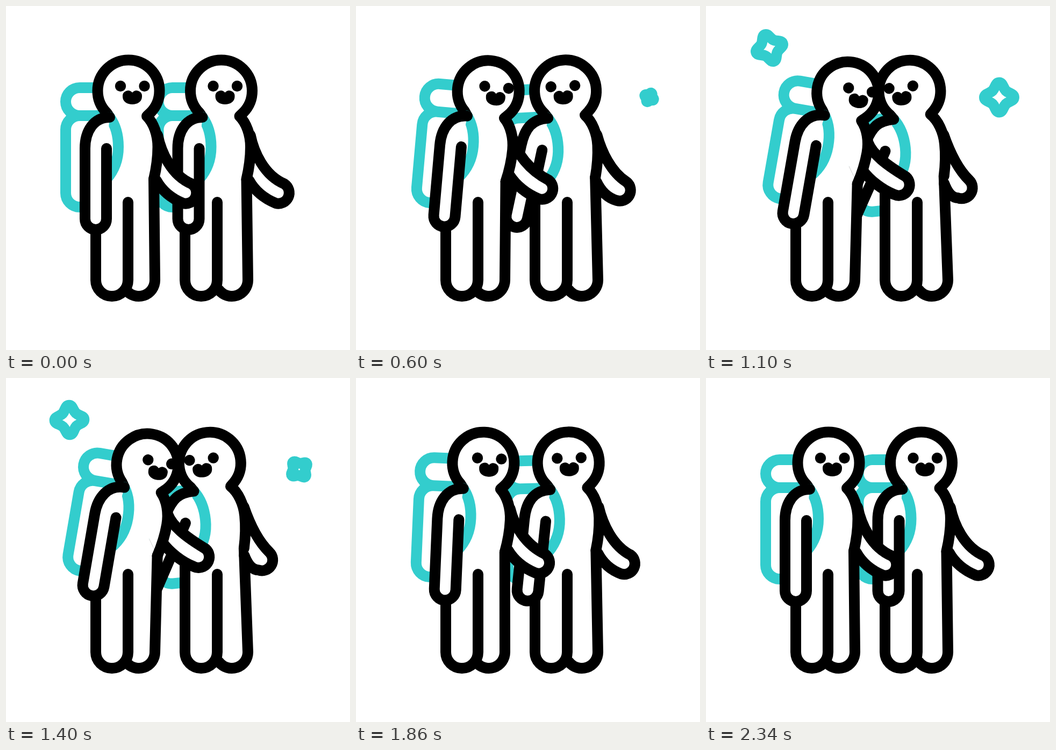
Recreate the animation shown at these times as an HTML page with a canvas. Size 640 by 640 pixels, loop 2400 ms.

```html
<!DOCTYPE html>
<html lang="en">
<head>
<meta charset="utf-8">
<title>Two hikers</title>
<style>
  html, body { margin: 0; height: 100%; overflow: hidden; background: #fff; }
  canvas { display: block; width: 100vw; height: 100vh; }
</style>
</head>
<body>
<canvas width="640" height="640"></canvas>
<script>
const ctx = document.querySelector('canvas').getContext('2d');
const TEAL = '#33cdcd', LOOP = 2400;
const RAD = Math.PI / 180;

const PACK = 'M178 152H137A26 26 0 0 0 137 204H188M137 204A26 26 0 0 0 111 230V348A26 26 0 0 0 137 374H165';
const STRAP = 'M193 207C204 222 209 240 209 262C209 285 202 305 187 322';
const BODY = 'M193 207L187 198.3A57.5 57.5 0 1 1 269 198.3L262 205C275 218 282.5 240 282.5 262C282.5 285 279 305 275 322';
const BELLY = 'M193 207L275 322L227 400L187 322Z';
const MOUTH = 'M217 168.5A10.2 10 0 0 1 235 161A10.2 10 0 0 1 253 168.5C253 178 244.5 183 235 183C225.5 183 217 178 217 168.5Z';
const STAR = 'M0 -27.5C7 -27.5 7 -17.8 12.4 -12.4C17.8 -7 27.5 -7 27.5 0';

const left = {
  shift: 0, legX: 167, footX: 247, lean: 10, swing: 0, gaze: 15,
  reach: [
    [282, 240, 288.5, 272, 307.5, 315, 345.5, 331, 329.5, 367, 307.5, 358, 290.5, 344, 279.5, 324],
    [301.5, 254, 310, 276, 335, 295, 372, 317.5, 350, 350.5, 328, 342, 305, 324, 291, 305]
  ]
};
const right = {
  shift: 172.5, legX: 333, footX: 420, lean: -6, swing: 30, gaze: -22.7,
  reach: [
    [454.5, 240, 461, 272, 480, 315, 518, 331, 502, 367, 480, 358, 463, 344, 452, 324],
    [442, 239, 452, 268, 468, 303, 489.5, 324, 468.5, 357, 460, 357, 451, 351, 443, 330]
  ]
};

const clamp = v => Math.min(1, Math.max(0, v));

// Symmetric S-curve, same as cubic-bezier(.75, 0, .25, 1)
function ease(x) {
  let lo = 0, hi = 1;
  for (let i = 0; i < 24; i++) {
    const s = (lo + hi) / 2, r = 1 - s;
    if (2.25 * s * r * r + 0.75 * s * s * r + s * s * s < x) lo = s; else hi = s;
  }
  return lo * lo * (3 - 2 * lo);
}

function turn(x, y, cx, cy, degrees) {
  const c = Math.cos(degrees * RAD), s = Math.sin(degrees * RAD);
  return [cx + c * (x - cx) - s * (y - cy), cy + s * (x - cx) + c * (y - cy)];
}

function draw(d, stroke, fill) {
  const path = new Path2D(d);
  if (fill) { ctx.fillStyle = fill; ctx.fill(path); }
  if (stroke) { ctx.strokeStyle = stroke; ctx.stroke(path); }
}

function dot(x, y, r) {
  ctx.fillStyle = '#000';
  ctx.beginPath();
  ctx.arc(x, y, r, 0, 7);
  ctx.fill();
}

function hangingArm(angle) {
  const at = (x, y) => turn(x, y, 180.5, 235, angle).join(' ');
  return `M193 207C163 207 ${at(147, 233)} ${at(147, 265)}L${at(147, 396)}` +
    `A20 20 0 0 0 ${at(187, 396)}L${at(187, 265)}`;
}

function reachingArm([from, to], p) {
  const n = from.map((v, i) => v + (to[i] - v) * p);
  const run = (a, b) => n.slice(a, b).join(' ');
  return `M${run(0, 2)}C${run(2, 8)}A20 20 0 0 1 ${run(8, 10)}C${run(10, 16)}`;
}

function figure({ shift, legX, footX, lean, swing, gaze, reach }, p) {
  const pivot = legX + 60, angle = lean * p;
  const hip = turn(275 + shift, 322, pivot, 365, angle).join(' ');
  const inBody = paint => {
    ctx.save();
    ctx.translate(pivot, 365);
    ctx.rotate(angle * RAD);
    ctx.translate(shift - pivot, -365);
    paint();
    ctx.restore();
  };

  inBody(() => {
    draw(PACK, TEAL);
    draw(BELLY, null, '#fff');
  });
  draw(`M${legX} 345V510H${footX + 30}L${hip}Z`, null, '#fff');
  draw(`M${legX} 345V510A30 30 0 0 0 ${pivot} 510V365`, '#000', '#fff');
  draw(`M${footX - 24} 528A30 30 0 0 0 ${footX + 30} 510L${hip}`, '#000');
  draw(reachingArm(reach, p), '#000', '#fff');
  inBody(() => {
    draw(BODY, '#000', '#fff');
    draw(STRAP, TEAL);
    draw(hangingArm(swing * p), '#000', '#fff');
    ctx.translate(gaze * p, 0);
    dot(213, 149, 10.2);
    dot(257.5, 149, 10.2);
    draw(MOUTH, null, '#000');
  });
}

function star(x, y, age) {
  const grow = clamp(age / 480), shrink = clamp((age - 518) / 480);
  const size = 1 - (1 - grow) ** 3 - shrink ** 3;
  if (size <= 0.001) return;
  ctx.save();
  ctx.translate(x, y);
  ctx.rotate(size * 2 * Math.PI);
  ctx.scale(size, size);
  ctx.lineWidth = 20 / size;
  const outline = new Path2D();
  for (let i = 0; i < 4; i++) {
    outline.addPath(new Path2D(STAR), new DOMMatrix().rotate(90 * i));
  }
  ctx.strokeStyle = TEAL;
  ctx.stroke(outline);
  ctx.restore();
}

function frame(now) {
  const t = now % LOOP;
  const p = t < 1200 ? ease(t / 1200) : 1 - ease(clamp((t - 1200) / 1140));
  ctx.fillStyle = '#fff';
  ctx.fillRect(0, 0, 640, 640);
  ctx.lineWidth = 20;
  ctx.lineCap = ctx.lineJoin = 'round';
  star(545.5, 170, t - 542);
  star(118, 78, t - 800);
  figure(right, p);
  figure(left, p);
}

const start = performance.now();
function tick() {
  frame(performance.now() - start);
  requestAnimationFrame(tick);
}
tick();
</script>
</body>
</html>
```
